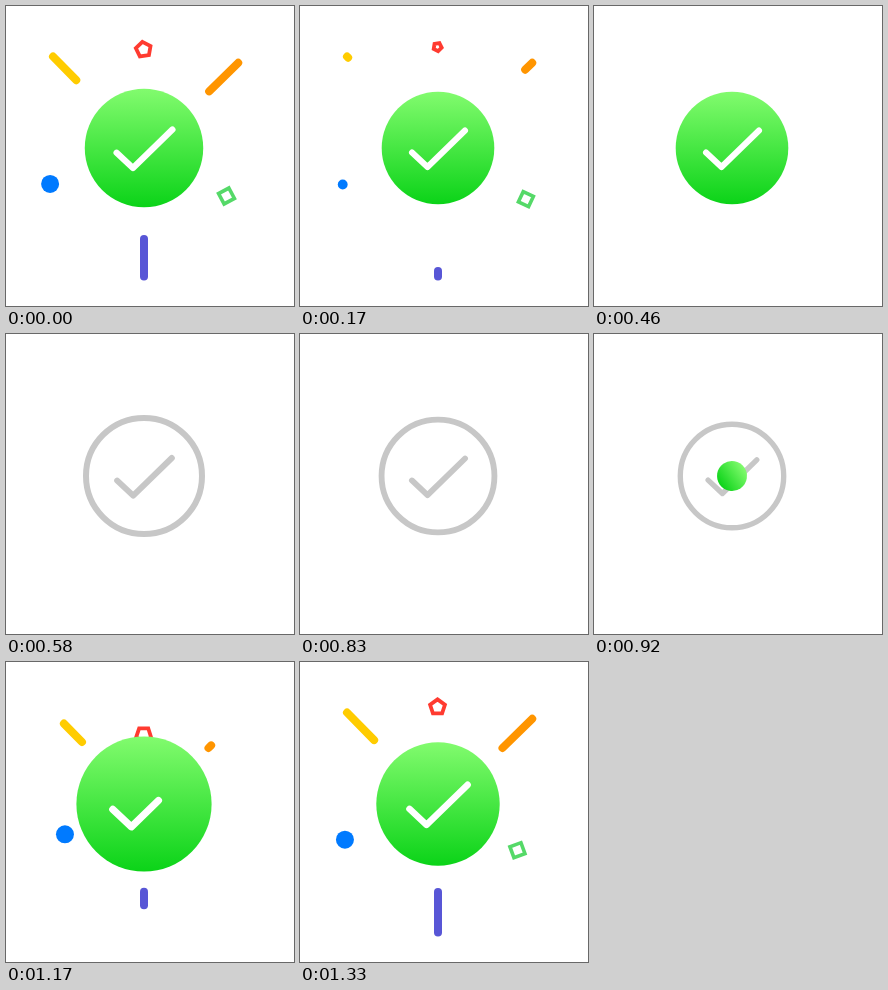
An HTML page for the animation above (1370 ms loop, 288x300 px).

```html
<!DOCTYPE html>
<html lang="en">
<head>
<meta charset="utf-8">
<title>Check burst</title>
<style>
  html, body { margin: 0; width: 100%; height: 100%; overflow: hidden; background: #fff; }
  svg { display: block; width: 288px; height: 300px; }
</style>
</head>
<body>
<svg viewBox="0 0 288 300" fill="none" stroke-linecap="round" stroke-linejoin="round">
  <defs>
    <linearGradient id="green" x1="0" y1="0" x2="0" y2="1">
      <stop offset="0" stop-color="#82fb6e"/>
      <stop offset="1" stop-color="#0bd318"/>
    </linearGradient>
  </defs>
  <g id="bars" stroke-width="8"></g>
  <circle id="dot" fill="#007aff"/>
  <path id="pentagon" stroke="#ff3b30" stroke-linejoin="miter"/>
  <path id="square" stroke="#55d968" stroke-linejoin="miter"/>
  <g id="off" stroke="#c7c7c7" stroke-width="6">
    <circle r="58"/>
    <path d="M-26.8 4.6L-10.8 19.6L27.8 -18"/>
  </g>
  <g id="on">
    <circle id="disc" r="56.3" fill="url(#green)"/>
    <path id="tick" d="M-26 4.5L-10.5 19L27 -17.5" pathLength="1" stroke="#fff" stroke-width="6"/>
  </g>
</svg>
<script>
const LOOP = 1370, STEP = 125 / 3, REVEAL = 580;
const CX = 138, CY = 142, REST = 56.3, PEAK = 67.6;
const $ = id => document.getElementById(id);
const set = (el, attrs) => { for (const k in attrs) el.setAttribute(k, attrs[k]); };
const show = (el, on) => set(el, { visibility: on ? 'visible' : 'hidden' });
const ramp = (t, start, length) => Math.min(1, Math.max(0, (t - start) / length));
const smooth = (t, start, length) => { const p = ramp(t, start, length); return p * p * (3 - 2 * p); };
const mix = (a, b, p) => a + (b - a) * p;

const bars = [
  { color: '#ffcc00', from: [76, 80], to: [47, 50.5], grow: 1050, fade: 1290 },
  { color: '#5856d6', from: [138, 229.8], to: [138, 270.5], grow: 1090, fade: 1322 },
  { color: '#ff9500', from: [202.5, 86], to: [232.2, 56.8], grow: 1130, fade: 1345 }
];
for (const bar of bars) {
  bar.el = document.createElementNS('http://www.w3.org/2000/svg', 'line');
  set(bar.el, { stroke: bar.color });
  $('bars').append(bar.el);
}

function drawBar({ el, from, to, grow, fade }, t) {
  const head = smooth(t, grow, 200), tail = smooth(t, fade, 280);
  show(el, head > 0 && tail < 1);
  set(el, {
    x1: mix(from[0], to[0], tail), y1: mix(from[1], to[1], tail),
    x2: mix(from[0], to[0], head), y2: mix(from[1], to[1], head)
  });
}

// Pieces fly out along a ray and slow down towards their limit.
function fly(t, angle, limit, lag, tau) {
  const d = Math.max(0, limit - lag * Math.exp((1170 - t) / tau));
  return [CX + d * Math.cos(angle), CY + d * Math.sin(angle)];
}

function drawPolygon(el, sides, radius, [x, y], angle, size, stroke) {
  show(el, size > 0);
  const points = Array.from({ length: sides }, (_, i) => {
    const a = (angle + i * 360 / sides) * Math.PI / 180;
    return [x + radius * size * Math.cos(a), y + radius * size * Math.sin(a)];
  });
  set(el, { d: 'M' + points.join('L') + 'Z', 'stroke-width': stroke * Math.min(1, size * 4) });
}

function drawPieces(t) {
  const out = t > 1080;
  const spin = -0.22 * (t - 1333);
  const [cx, cy] = fly(t, Math.atan2(36, -94), 102.3, 17, 88);
  set($('dot'), { cx, cy, r: out ? 9 * (1 - smooth(t, 1410, 270)) : 0 });
  drawPolygon($('pentagon'), 5, 7.8, fly(t, -Math.PI / 2 - 0.005, 101.5, 31, 86),
    spin - 90, out ? 1 - smooth(t, 1400, 290) : 0, 3.8);
  drawPolygon($('square'), 4, 8.3, fly(t, Math.atan2(48, 82.5), 103, 62, 95),
    spin - 65, out ? 1 - smooth(t, 1500, 300) : 0, 3.6);
}

function drawBadge(t) {
  const press = 1 - 0.21 * ramp(t, 750, 232) ** 2;
  show($('off'), t < 985);
  set($('off'), { transform: `translate(${CX} ${CY}) scale(${press})` });

  const pop = 1 - (1 - ramp(t, 890, 280)) ** 2.5;
  const radius = mix(PEAK * pop, REST, smooth(t, 1210, 240));
  show($('on'), pop > 0);
  set($('on'), { transform: `translate(${CX} ${CY}) scale(${radius / REST})` });
  set($('disc'), { transform: `rotate(${70 * (1 - pop)})` });

  const drawn = smooth(t, 1050, 180);
  set($('tick'), { 'stroke-dasharray': `${drawn} 2`, 'stroke-opacity': drawn > 0 ? 1 : 0 });
}

function render(now) {
  const time = Math.floor((now % LOOP + 4) / STEP) * STEP;
  // The burst runs across the loop seam, so early times continue the previous pass.
  const t = time < REVEAL ? time + LOOP : time;
  bars.forEach(bar => drawBar(bar, t));
  drawPieces(t);
  drawBadge(t);
}

const start = performance.now();
function tick() {
  render(Math.max(0, performance.now() - start));
  requestAnimationFrame(tick);
}
tick();
</script>
</body>
</html>
```
